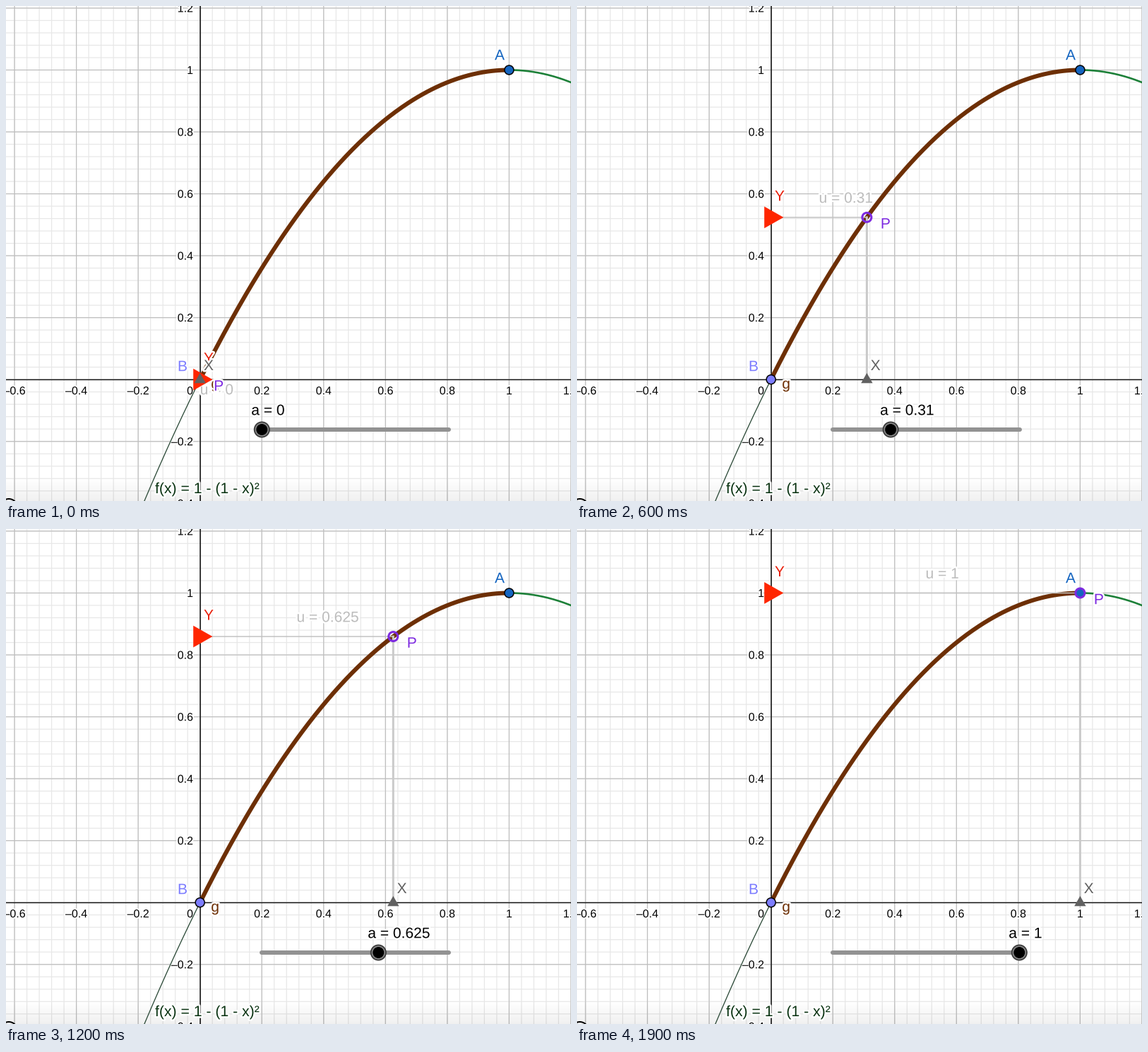
These frames come from a looping animation (800 px wide and 700 px high, 2 s). A matplotlib script:

```python
import numpy as np
import matplotlib.pyplot as plt
import matplotlib.patheffects as pe
from matplotlib.animation import FuncAnimation
from matplotlib.patches import Circle, Polygon

W, H, DPI = 800, 700, 100
FRAMES, INTERVAL = 20, 100
X0, Y0, UNIT = 274.7, 528.2, 437.7
PT = 72 / DPI

plt.rcParams["font.family"] = "Liberation Sans"
plt.rcParams["text.hinting"] = "none"

BROWN, PURPLE, GRAY = "#6d2f05", "#7d2ae0", "#616161"

fig = plt.figure(figsize=(W / DPI, H / DPI), dpi=DPI, facecolor="white")
ax = fig.add_axes([0, 0, 1, 1])
ax.set_xlim(0, W)
ax.set_ylim(H, 0)
ax.axis("off")


def px(x):
    return X0 + UNIT * x


def py(y):
    return Y0 - UNIT * y


def f(x):
    return 1 - (1 - x) ** 2


def line(xs, ys, color, width, z, cap="butt"):
    return ax.plot(xs, ys, color=color, lw=width * PT, zorder=z,
                   solid_capstyle=cap, snap=False)[0]


def label(x, y, s, color="black", size=21, z=8, ha="left", halo=5):
    fx = [pe.withStroke(linewidth=halo * PT, foreground="white")]
    return ax.text(x, y, s, color=color, fontsize=size * PT, ha=ha,
                   va="baseline", zorder=z, path_effects=fx)


def dot(x, y, r, face, edge, width, z):
    return ax.add_patch(Circle((x, y), r, fc=face, ec=edge,
                               lw=width * PT, zorder=z))


def triangle(face, z):
    return ax.add_patch(Polygon([(0, 0)] * 3, fc=face, ec="none",
                                zorder=z, snap=False))


def curve(a, b, color, width, z):
    x = np.linspace(a, b, 200)
    return line(px(x), py(f(x)), color, width, z)


def grid(step, color, z):
    for k in range(-40, 41):
        x, y = px(k * step), py(k * step)
        if 0 < x < W:
            line([x, x], [0, H], color, 1.2, z)
        if 0 < y < H:
            line([0, W], [y, y], color, 1.2, z)


def tick(k):
    return f"{k / 5:g}".replace("-", "–")


def draw_board():
    grid(0.04, "#e7e7e7", 1)
    grid(0.2, "#bebebe", 1.1)
    shade = np.zeros((34, 1, 4))
    shade[:, 0, 3] = np.linspace(0, 0.06, 34)
    ax.imshow(shade, extent=(0, W, H, H - 34), aspect="auto", zorder=1.2)
    ax.set_xlim(0, W)
    ax.set_ylim(H, 0)

    line([X0 + 0.4] * 2, [0, H], "black", 1.4, 2)
    line([0, W], [Y0 + 0.3] * 2, "#111111", 1.4, 2)
    for k in range(-3, 7):
        if k:
            label(px(k / 5), 549.3, tick(k), size=16, z=3, ha="center", halo=4)
        if k >= -2:
            y = 549.3 if k == 0 else py(k / 5) + 5.6
            label(265, y, tick(k), size=16, z=3, ha="right", halo=4)

    curve(-0.2, 0, "#2c4a38", 1.3, 4)
    curve(1, 1.22, "#1c8038", 2.6, 4)
    curve(0, 1, BROWN, 6, 4.2)
    label(211, 689, "f(x) = 1 - (1 - x)²", "#0a3312", size=21.2, z=4.4)
    label(290.3, 541, "g", BROWN, z=5.5)

    dot(px(1), py(1), 6.5, "#1565c0", "black", 1.5, 6)
    dot(px(0), py(0), 6.5, "#7d7dff", "black", 1.5, 6)
    label(699, 76.2, "A", "#1565c0", ha="center")
    label(250, 516.2, "B", "#7d7dff", ha="center")

    line([362, 627], [599, 599], "#929292", 6, 6, "round")
    dot(4, 709, 12, "none", "black", 2, 6)


draw_board()

seg_y = line([], [], "#c2c2c2", 1.5, 5, "projecting")
seg_x = line([], [], "#cacaca", 3, 5, "projecting")
u_text = label(0, 0, "", "#bcbcbc", z=5.2)
ring = dot(0, 0, 6.5, "none", PURPLE, 3, 6.5)
tri_y = triangle("#ff2600", 7)
tri_x = triangle(GRAY, 7.2)
p_text = label(0, 0, "P", PURPLE, z=8.2, ha="center")
y_text = label(287, 0, "Y", "#e8200c", z=8, ha="center")
x_text = label(0, 515, "X", GRAY, z=8.1, ha="center")
knob = dot(0, 599, 10.6, "#888888", "#3c3c3c", 1.8, 7)
core = dot(0, 599, 8, "black", "none", 0, 7.1)
a_text = label(0, 578.3, "")


def value(i):
    """Slider value, snapped to its step of 0.005."""
    a = np.interp(i, [0, 4, 8, 12, 14, 17, 19],
                  [0, 0.2, 0.425, 0.625, 0.735, 0.895, 1])
    return round(round(a / 0.005) * 0.005, 3)


def update(i):
    a = value(i)
    x, y = px(a), py(f(a))
    seg_y.set_data([X0, x], [y, y])
    seg_x.set_data([x, x], [Y0, y])
    seg_x.set_visible(a > 0)
    seg_y.set_visible(a > 0)

    u_text.set_text(f"u = {a:g}")
    u_text.set_position(((X0 + x) / 2, y - 20.7 if a > 0 else y + 21))
    ring.center = x, y
    p_text.set_position((x + 26.5, y + 15.7))
    y_text.set_y(y - 23.5)
    x_text.set_x(x + 12.3)
    tri_y.set_xy([(265.2, y - 15.4), (265.2, y + 15.4), (292.4, y)])
    tri_x.set_xy([(x, 519), (x - 8.2, 533.3), (x + 8.2, 533.3)])

    s = 362.3 + 264 * a
    knob.center = core.center = s, 599
    a_text.set_text(f"a = {a:g}")
    a_text.set_x(s - 15)
    return ()


anim = FuncAnimation(fig, update, frames=FRAMES, interval=INTERVAL,
                     init_func=lambda: update(0), repeat=True)
plt.show()
```
